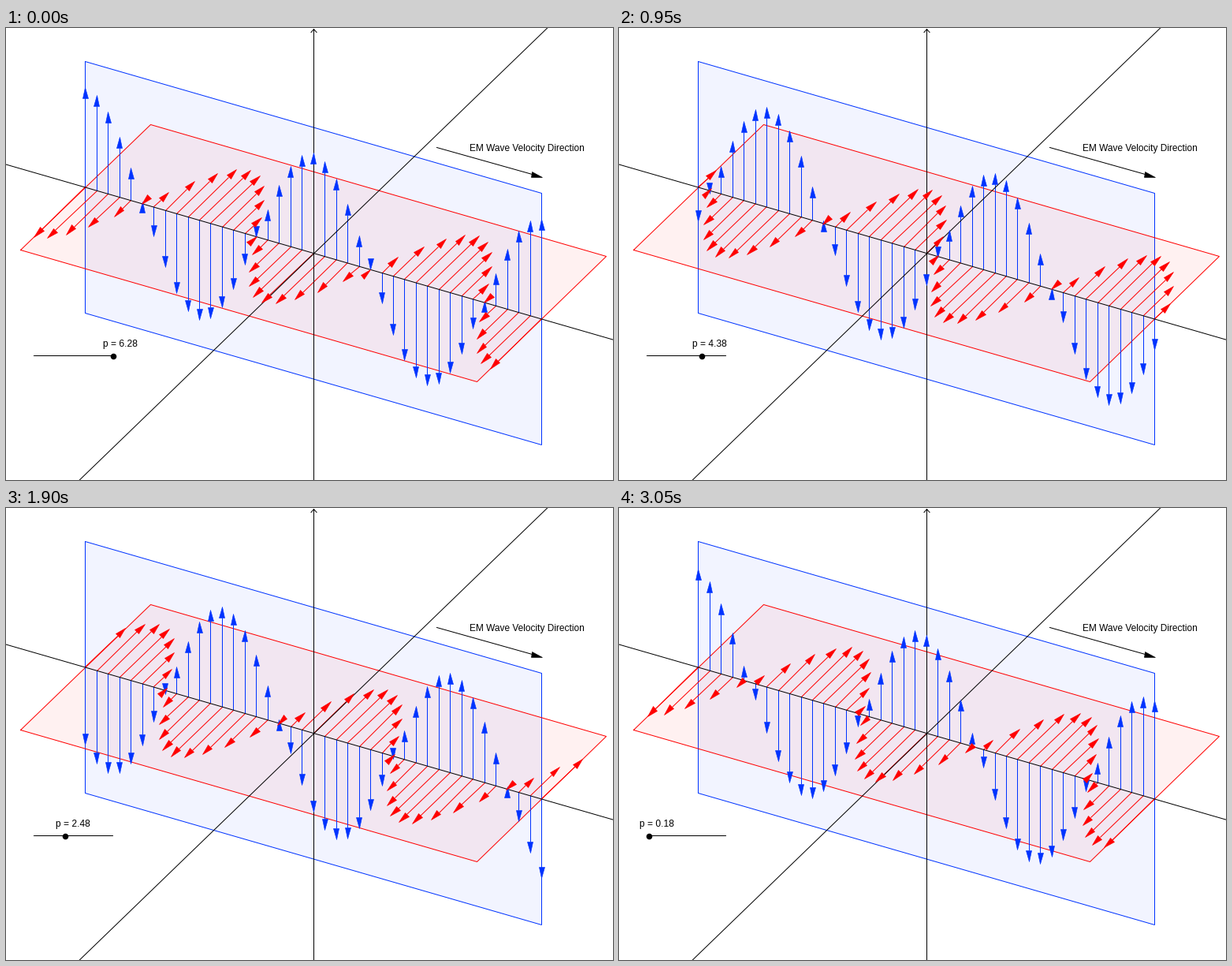
Recreate the animation shown at these times as a matplotlib script. Size 770 by 573 pixels, loop 3100 ms.

```python
import numpy as np
import matplotlib.pyplot as plt
from matplotlib.animation import FuncAnimation
from matplotlib.collections import LineCollection, PolyCollection

W, H, DPI = 770, 573, 64
PX = 72 / DPI                     # one pixel in points
FRAMES, INTERVAL = 62, 50
BLUE, RED, BLACK = "#0033ff", "#ff0000", "#000000"

CENTER = np.array([390.2, 285.4])
ALONG = np.array([289.4, 83.5])   # half length of the propagation axis
UP = np.array([0, -159.5])        # half height of the electric plane
OUT = np.array([-82.4, 79.7])     # half width of the magnetic plane
AMP = 0.7925
HEAD = 14
REACH = 6.3                       # phase at the end of the axis

N = 41
S = np.linspace(-1, 1, N)
BASES = CENTER + S[:, None] * ALONG

plt.rcParams["font.family"] = "Liberation Sans"
fig = plt.figure(figsize=(W / DPI, H / DPI), dpi=DPI, facecolor="white")
ax = fig.add_axes([0, 0, 1, 1])
ax.set_xlim(0, W)
ax.set_ylim(H, 0)
ax.axis("off")


def snap(points):
    """Move points to pixel centres."""
    return np.floor(points) + 0.5


def line(points, color=BLACK, z=4):
    xs, ys = zip(*points)
    ax.plot(xs, ys, color=color, lw=PX, zorder=z, snap=False,
            solid_capstyle="projecting", solid_joinstyle="miter")


def plane(side, color, alpha, z):
    corners = snap([CENTER - ALONG + side, CENTER + ALONG + side,
                    CENTER + ALONG - side, CENTER - ALONG - side])
    ax.fill(*corners.T, color=color, alpha=alpha, lw=0, zorder=z)
    line([*corners, corners[0]], color, z + 0.5)


def arrow_parts(start, delta, unit):
    """Stems and fixed-size triangular heads for rows of vectors."""
    tip = start + delta
    back = tip - HEAD * unit
    wing = HEAD / 4 * np.stack([-unit[:, 1], unit[:, 0]], axis=1)
    inner = np.where((delta * unit).sum(1)[:, None] > HEAD, back, start)
    return (snap(np.stack([start, inner], axis=1)),
            snap(np.stack([tip, back + wing, back - wing], axis=1)))


class Field:
    def __init__(self, side, color, z):
        self.side = side * AMP
        self.unit = side / np.hypot(*side)
        self.stems = LineCollection([], colors=color, linewidths=PX,
                                    snap=False, zorder=z)
        self.heads = PolyCollection([], facecolors=color, edgecolors=color,
                                    linewidths=0.6 * PX, snap=False,
                                    zorder=z + 2)
        ax.add_collection(self.stems, autolim=False)
        ax.add_collection(self.heads, autolim=False)

    def update(self, wave):
        wave = wave[:, None]
        stems, heads = arrow_parts(BASES, wave * self.side,
                                   np.sign(wave) * self.unit)
        self.stems.set_segments(stems)
        self.heads.set_verts(heads)


plane(UP, BLUE, 0.05, 1)
plane(OUT, RED, 0.055, 2)

# Coordinate axes
line([(0, 173.0), (W, 395.1)])
line([(93.3, H), (686.7, 0)])
line([(390.5, H), (390.5, 1.5)])
line([(387, 5.5), (390.5, 1.5), (394, 5.5)])

# Propagation direction
start, end = np.array([[546.5, 151.5]]), np.array([[680.5, 189.5]])
delta = end - start
stem, head = arrow_parts(start, delta, delta / np.hypot(*delta[0]))
line(stem[0])
ax.fill(*head[0].T, color=BLACK, lw=0.6 * PX, snap=False, zorder=5)
ax.text(587.5, 156, "EM Wave Velocity Direction", fontsize=11.9 * PX,
        va="baseline", zorder=6)

# Slider
line([(35.5, 415.5), (135.5, 415.5)])
knob, = ax.plot([], [], "o", color=BLACK, ms=7.6 * PX, mew=0, snap=False,
                zorder=6)
label = ax.text(0, 404, "", fontsize=12 * PX, va="baseline", zorder=6)

fields = [Field(UP, BLUE, 3.2), Field(OUT, RED, 3.4)]


def update(i):
    p = 6.28 - 0.1 * i
    wave = np.cos(REACH * S + p)
    for field in fields:
        field.update(wave)
    x = 35.5 + 100 * p / 6.28
    knob.set_data([x], [415.5])
    label.set_x(round(x - 12.2))
    label.set_text(f"p = {p:.2f}")
    return []


anim = FuncAnimation(fig, update, frames=FRAMES, interval=INTERVAL,
                     repeat=True, repeat_delay=0, blit=False)
plt.show()
```
